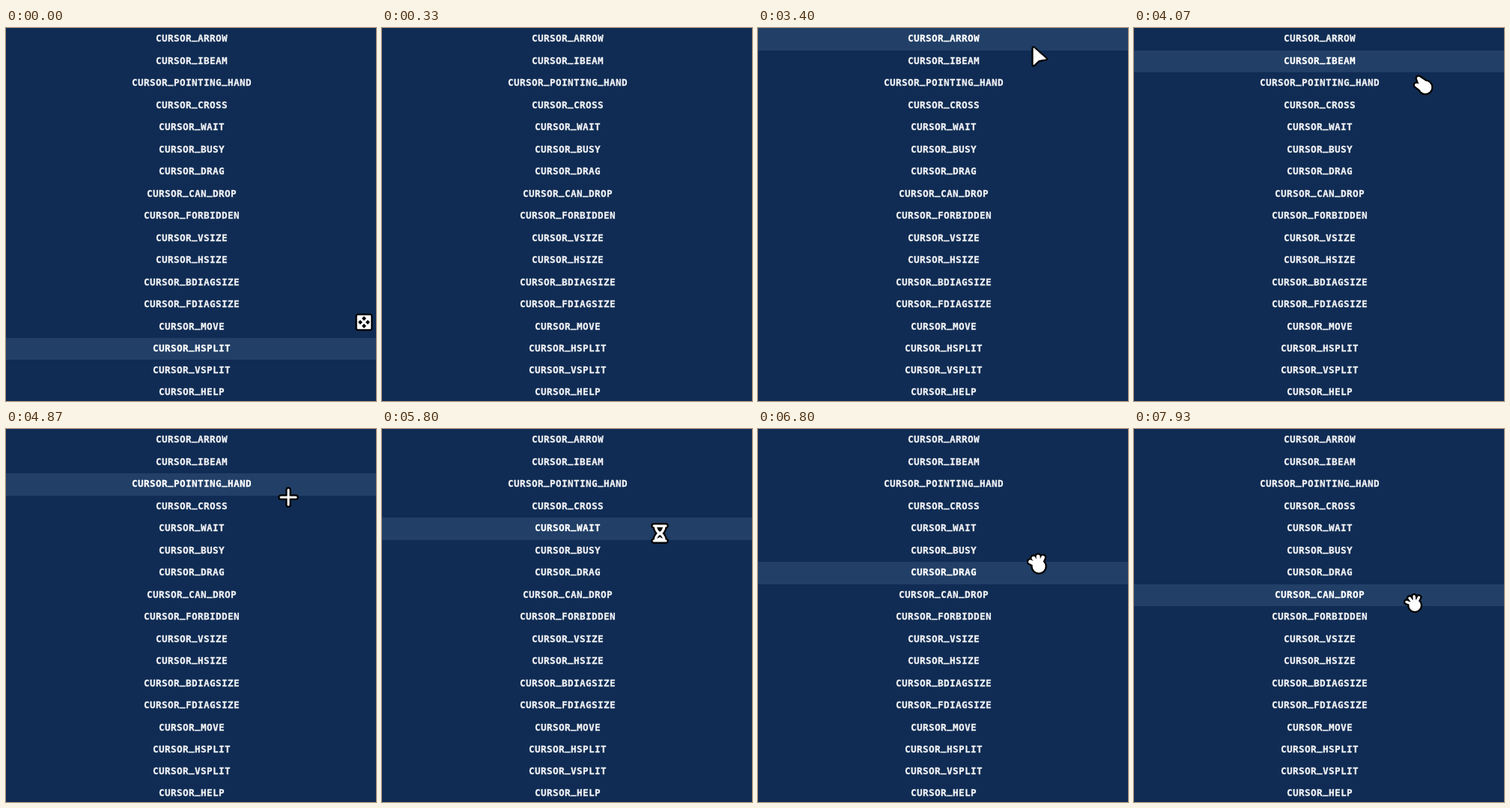
These frames come from a looping animation (494x497 px, 8000 ms). An HTML page:

```html
<!DOCTYPE html>
<html lang="en">
<head>
<meta charset="utf-8">
<title>Cursor shapes</title>
<style>
  html, body { margin: 0; width: 100%; height: 100%; overflow: hidden; }
  #stage { position: relative; width: 100%; height: 100%; overflow: hidden; background: #102c54; }
  .row {
    position: absolute; left: 0; right: 0; text-align: center; text-indent: 2px; color: #f0f1f4;
    font: bold 12.5px/28px "DejaVu Sans Mono", monospace; letter-spacing: .47px;
    -webkit-text-stroke: .3px;
  }
  .row.hover { background: #213f67; color: #fff; }
  .row i { font-style: normal; position: relative; top: -3px; }
  svg { position: absolute; left: 0; top: 0; width: 100%; height: 100%; }
  path { stroke-linejoin: round; stroke-linecap: round; }
</style>
</head>
<body>
<div id="stage">
  <svg><g id="cursor">
    <path id="outline" fill="#000" stroke="#000"/>
    <path id="body" fill="#fff" stroke="#fff"/>
    <path id="ink"/>
  </g></svg>
</div>
<script>
const LOOP = 8000, STEPS = 120, PITCH = 29.5;
const names = ['ARROW', 'IBEAM', 'POINTING_HAND', 'CROSS', 'WAIT', 'BUSY', 'DRAG', 'CAN_DROP',
  'FORBIDDEN', 'VSIZE', 'HSIZE', 'BDIAGSIZE', 'FDIAGSIZE', 'MOVE', 'HSPLIT', 'VSPLIT', 'HELP'];
const $ = id => document.getElementById(id);

const disc = (x, y, r) => `M${x - r} ${y}a${r} ${r} 0 1 0 ${2 * r} 0a${r} ${r} 0 1 0 ${-2 * r} 0Z`;

// A palm with a thumb and three fingers fanned out from its centre.
function hand(length, spread) {
  const x = 2, y = 3;
  let path = disc(x, y, 6);
  for (let finger = 0; finger < 4; finger++) {
    const angle = (finger - 2.15) * spread;
    path += `M${x} ${y}L${x + length * Math.sin(angle)} ${y - length * Math.cos(angle)}`;
  }
  return path;
}

// A diamond on each side of the centre.
const fourDiamonds = [[0, -5], [5, 0], [0, 5], [-5, 0]]
  .map(([x, y]) => `M${x} ${y - 3}l3 3l-3 3l-3-3Z`).join('');

const hourglass = {
  body: 'M-8-10H8M-8 10H8M-6-10Q-6-4-1 0Q-6 4-6 10H6Q6 4 1 0Q6-4 6-10Z', width: 3,
  ink: 'M-4-8H4Q3-4 0-2Q-3-4-4-8ZM-4 7Q-3 4 0 2Q3 4 4 7L0 5Z'
};
const shapes = {
  ARROW: { body: 'M2 3V25L9 18.5L18 17Z', width: 1 },
  IBEAM: { body: 'M-4-10H4M0-10V10M-4 10H4', width: 3 },
  POINTING_HAND: { body: disc(10, 15, 6) + 'M1 3L5 14L-2 12L7 19L10 9Z', width: 4.5 },
  CROSS: { body: 'M-10 0H10M0-10V10', width: 3 },
  WAIT: hourglass,
  BUSY: hourglass,
  DRAG: { body: hand(13, .5), width: 5 },
  CAN_DROP: { body: hand(12, .55), width: 3.5 },
  MOVE: { body: 'M-8-8H8V8H-8Z', width: 2.5, ink: fourDiamonds }
};

// Pointer glides: first step, last step, x and y reached. It rests between them.
const EXIT = 5, ENTER = 37;
const glides = [
  [-1, 0, 478, 392], [0, 4, 450, 25], [36, 37, 343, 3],
  [37, 42, 360, 11], [48, 54, 372, 36], [57, 61, 379, 64], [61, 65, 380, 77], [69, 77, 374, 105],
  [78, 91, 370, 154], [91, 104, 373, 185], [104, 116, 373, 222], [117, 119, 373, 232]
];

function pointerAt(step) {
  if (step >= EXIT && step < ENTER) return null;
  let x = 478, y = 428;
  for (const [from, to, toX, toY] of glides) {
    const k = Math.max(0, Math.min(1, (step - from) / (to - from)));
    x += (toX - x) * k;
    y += (toY - y) * k;
  }
  return { x: Math.round(x), y: Math.round(y) };
}

const rowAt = y => Math.floor(y / PITCH);
const rowTop = n => Math.round(PITCH * n) - (n > 14 ? 1 : 0);

const rows = names.map((name, n) => {
  const row = document.createElement('div');
  row.className = 'row';
  row.style.top = rowTop(n) + 'px';
  row.style.height = rowTop(n + 1) - rowTop(n) + 'px';
  row.innerHTML = ('CURSOR_' + name).replace(/_/g, '<i>_</i>');
  $('stage').insertBefore(row, $('stage').lastElementChild);
  return row;
});

function setPath(id, d, width) {
  $(id).setAttribute('d', d);
  $(id).setAttribute('stroke-width', width);
}

function draw(step) {
  const pointer = pointerAt(step);
  // The highlight trails the pointer by one step.
  const hovered = pointer ? rowAt((pointerAt(step - 1) || pointer).y) : -1;
  rows.forEach((row, n) => row.classList.toggle('hover', n === hovered));
  $('cursor').style.display = pointer ? '' : 'none';
  if (!pointer) return;
  const { body, width, ink = '' } = shapes[names[rowAt(pointer.y)]] || shapes.ARROW;
  $('cursor').setAttribute('transform', `translate(${pointer.x} ${pointer.y})`);
  setPath('outline', body, width + 4.5);
  setPath('body', body, width);
  setPath('ink', ink, 0);
}

const start = performance.now();
function tick() {
  const time = (performance.now() - start) % LOOP;
  // Step times are rounded to 10 ms, so each step may begin slightly early.
  draw(Math.min(STEPS - 1, Math.floor((time + 4) / LOOP * STEPS)));
  requestAnimationFrame(tick);
}
tick();
</script>
</body>
</html>
```
